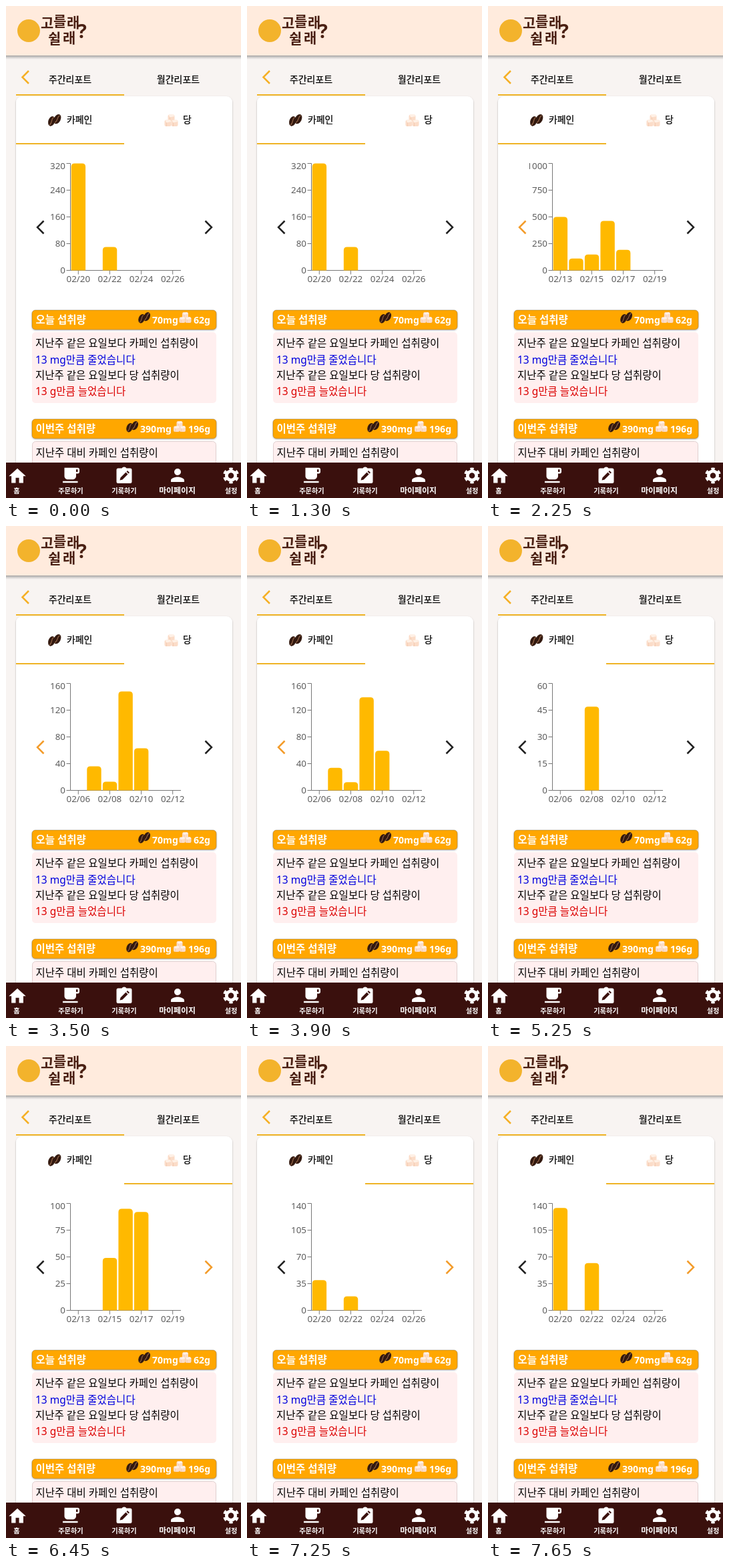
An HTML page that plays this animation: 352 px wide and 736 px high, repeating every 7950 ms.

```html
<!DOCTYPE html>
<html lang="ko">
<head>
<meta charset="utf-8">
<style>
  html, body { margin: 0; width: 100%; height: 100%; overflow: hidden; background: #f8f4f2; }
  svg { display: block; }
  text { font-family: "Noto Sans", "Noto Sans CJK KR", "Noto Sans CJK", sans-serif; font-size: 13.9px; }
  .mid { text-anchor: middle; }
  .tab { stroke: #000; stroke-width: .25; }
  .body text { font-size: 15.5px; }
  .head { fill: #fff; font-weight: 600; }
  .head text { font-size: 14.1px; }
  .head .title { font-size: 15.5px; font-weight: 700; }
  .bar { fill: #ffa700; stroke: #7a5a1e; stroke-opacity: .4; }
  .axis text { font-size: 13.4px; fill: #5c5c5c; }
  .chevron { fill: none; stroke: #222; stroke-width: 2.5; }
  .nav { fill: #fff; }
  .nav text { font-size: 10.2px; font-weight: 700; text-anchor: middle; }
  .word { fill: #4a2013; font-weight: 700; }
</style>
</head>
<body>
<svg width="352" height="736" viewBox="0 0 352 736">
  <defs>
    <linearGradient id="shade" x2="0" y2="1">
      <stop stop-color="#777" stop-opacity=".65"/><stop offset="1" stop-color="#999" stop-opacity="0"/>
    </linearGradient>
    <filter id="drop" x="-10%" y="-20%" width="120%" height="150%">
      <feDropShadow dx="0" dy="1" stdDeviation="1.2" flood-opacity=".3"/>
    </filter>
    <g id="bean">
      <ellipse rx="4.900" ry="7.600" fill="#33190f"/>
      <path d="M1-6.500C-2.500-3 2.500 2-1 6.500" fill="none" stroke="#9a6a4c" stroke-width="1.100"/>
    </g>
    <g id="beans">
      <use href="#bean" transform="translate(-4.200 1.800) rotate(20)"/>
      <use href="#bean" transform="translate(4.400 -1.400) rotate(26)"/>
    </g>
    <g id="cube">
      <rect x="-5" y="-4.500" width="10" height="9.500" rx="2.200" fill="#fbdcc8"/>
      <path d="M-4-4L3-5 5-2-2-.5z" fill="#fff1e6"/>
      <path d="M-2-.5V5" stroke="#efc3aa" stroke-width=".7"/>
    </g>
    <g id="cubes">
      <use href="#cube" y="-4"/><use href="#cube" x="-5" y="4"/><use href="#cube" x="5" y="4"/>
    </g>
    <clipPath id="plot"><rect x="62" y="230" width="210" height="190"/></clipPath>
    <clipPath id="tab"><rect x="177" y="134" width="162" height="72"/></clipPath>
  </defs>

  <rect width="352" height="736" fill="#f8f4f2"/>
  <rect y="74" width="352" height="6" fill="url(#shade)"/>
  <rect width="352" height="74" fill="#ffebdd"/>
  <circle cx="34" cy="37" r="17" fill="#f3b32c"/>
  <text class="word" x="52 71 91" y="33 30 32" style="font-size:21px">고를래</text>
  <text class="word" x="63 85 107" y="56 55 48" style="font-size:21px">쉴래<tspan style="font-size:29px">?</tspan></text>

  <path class="chevron" d="M34 97l-9.500 9.500 9.500 9.500" style="stroke:#f5b025"/>
  <text class="mid tab" x="96" y="114.500">주간리포트</text>
  <text class="mid tab" x="258" y="114.500">월간리포트</text>
  <rect x="15" y="135" width="324" height="620" rx="9" fill="#fff" filter="url(#drop)"/>
  <rect x="15" y="132" width="162" height="2" fill="#efb426"/>

  <circle id="ripple" cx="268" cy="185" clip-path="url(#tab)"/>
  <use href="#beans" x="72.500" y="170.500"/>
  <text class="tab" x="91" y="174.500">카페인</text>
  <use href="#cubes" x="247.500" y="171"/>
  <text class="tab" x="265" y="174.500">당</text>
  <rect id="indicator" y="205" width="162" height="2" fill="#efb426"/>

  <path id="prev" class="chevron" d="M56.500 321.500l-9.500 9.500 9.500 9.500"/>
  <path id="next" class="chevron" d="M298.500 321.500l9.500 9.500-9.500 9.500"/>
  <g id="chart" class="axis" clip-path="url(#plot)"></g>

  <g class="head">
    <rect class="bar" x="39" y="455" width="276" height="29" rx="5" filter="url(#drop)"/>
    <text class="title" x="44.500" y="475">오늘 섭취량</text>
    <use href="#beans" transform="translate(207 466) scale(.92)"/>
    <text x="219" y="475">70mg</text>
    <use href="#cubes" transform="translate(268.500 466) scale(.9)"/>
    <text x="281" y="475">62g</text>
    <rect class="bar" x="39" y="618" width="276" height="29" rx="5" filter="url(#drop)"/>
    <text class="title" x="44.500" y="638">이번주 섭취량</text>
    <use href="#beans" transform="translate(189 629) scale(.92)"/>
    <text x="201" y="638">390mg</text>
    <use href="#cubes" transform="translate(260 629) scale(.9)"/>
    <text x="273" y="638">196g</text>
  </g>
  <g class="body">
    <rect x="39" y="488" width="276" height="106" rx="5" fill="#ffefef"/>
    <text x="44" y="510">지난주 같은 요일보다 카페인 섭취량이</text>
    <text x="44" y="534.500" fill="#00d">13 mg만큼 줄었습니다</text>
    <text x="44" y="558">지난주 같은 요일보다 당 섭취량이</text>
    <text x="44" y="582" fill="#dc0000">13 g만큼 늘었습니다</text>
    <rect x="39.500" y="651.500" width="275" height="80" rx="5" fill="#ffefef" stroke="#e0cfcf"/>
    <text x="44.500" y="673.500">지난주 대비 카페인 섭취량이</text>
  </g>

  <g class="nav">
    <rect y="683" width="352" height="53" fill="#3a100d"/>
    <path transform="translate(1.800 688) scale(1.270)" d="M10 20v-6h4v6h5v-8h3L12 3 2 12h3v8z"/>
    <path transform="translate(82.500 687) scale(1.250)" d="M20 3H4v10c0 2.210 1.790 4 4 4h6c2.210 0 4-1.790 4-4v-3h2c1.110 0 2-.89 2-2V5c0-1.110-.89-2-2-2zm0 5h-2V5h2zM2 21h18v-2H2z"/>
    <path d="M168 691.500h5.500a4 4 0 0 1 7 0h5.500q2.500 0 2.500 2.500v17.500q0 2.500-2.500 2.500h-18q-2.500 0-2.500-2.500V694q0-2.500 2.500-2.500z"/>
    <path d="M170.500 709.500l1-4 8-8 3 3-8 8zM180.500 696.500l1.500-1.500 3 3-1.500 1.500z" fill="#3a100d"/>
    <path transform="translate(242 687) scale(1.250)" d="M12 12a4 4 0 1 0 0-8 4 4 0 0 0 0 8zm0 2c-2.670 0-8 1.340-8 4v2h16v-2c0-2.660-5.330-4-8-4z"/>
    <g transform="translate(337 702.500) rotate(-90)" fill="none" stroke="#fff">
      <circle r="6.700" stroke-width="4.800"/>
      <circle r="10" stroke-width="4" pathLength="12" stroke-dasharray="1 1" stroke-dashoffset=".5"/>
    </g>
    <text x="16" y="729">홈</text>
    <text x="97" y="729">주문하기</text>
    <text x="177" y="729">기록하기</text>
    <text x="256.500" y="729" style="font-size:11.900px">마이페이지</text>
    <text x="337" y="729">설정</text>
  </g>
</svg>
<script>
const LOOP = 7950, TICK = 50, GROW = 500;
const BASE = 395.5, LEFT = 96.5, HEIGHT = 160, BAND = 165 / 7;

// Each view appears at `show`; its bars grow from zero starting at `grow`.
const views = [
  { show: 0, grow: -GROW, day: 20, step: 80, data: [320, 0, 70] },
  { show: 2050, grow: 2100, day: 13, step: 250, data: [975, 215, 290, 900, 375] },
  { show: 3500, grow: 3550, day: 6, step: 40, data: [0, 36, 13, 148, 63] },
  { show: 4750, grow: 4750, day: 6, step: 15, data: [0, 0, 47] },
  { show: 5900, grow: 5950, day: 13, step: 25, data: [0, 0, 49, 95, 92] },
  { show: 7100, grow: 7150, day: 20, step: 35, data: [134, 0, 62] }
];

const el = id => document.getElementById(id);
const clamp = v => Math.min(1, Math.max(0, v));

function bezier(x1, y1, x2, y2) {
  const at = (a, b, u) => 3 * a * u * (1 - u) ** 2 + 3 * b * u * u * (1 - u) + u ** 3;
  return x => {
    if (x <= 0 || x >= 1) return clamp(x);
    let lo = 0, hi = 1;
    for (let i = 0; i < 24; i++) {
      const m = (lo + hi) / 2;
      if (at(x1, x2, m) < x) lo = m; else hi = m;
    }
    return at(y1, y2, lo);
  };
}
const ease = bezier(.25, .1, .25, 1);
const standard = bezier(.4, 0, .2, 1);

function bar(i, h) {
  if (h < .3) return '';
  const r = Math.min(5, h), w = 21.4, x = LEFT + BAND * i + 1.2;
  return `<path fill="#ffb900" d="M${x} ${BASE}v${r - h}q0 ${-r} ${r} ${-r}h${w - 2 * r}q${r} 0 ${r} ${r}v${h - r}z"/>`;
}

function chart({ day, step, data }, scale) {
  let lines = `M${LEFT} ${BASE - HEIGHT}V${BASE}H262`, out = '';
  for (let i = 0; i < 5; i++) {
    const y = BASE - i * 40;
    lines += `M${LEFT - 6} ${y}h6`;
    out += `<text text-anchor="end" x="89" y="${Math.max(y, 239.5) + 4.7}">${i * step}</text>`;
  }
  for (let i = 0; i < 7; i += 2) {
    const x = LEFT + BAND * (i + .5);
    lines += `M${x} ${BASE}v6`;
    out += `<text class="mid" x="${x}" y="413">02/${String(day + i).padStart(2, '0')}</text>`;
  }
  const bars = data.map((v, i) => bar(i, v / step / 4 * HEIGHT * scale)).join('');
  return `<path d="${lines}" stroke="#777" fill="none"/>${out}${bars}`;
}

function draw(t) {
  const view = views.filter(v => v.show <= t).pop();
  const scale = t < view.grow ? 1 : ease((t - view.grow) / GROW);
  el('chart').innerHTML = chart(view, scale);

  const tint = on => on ? '#f39c2b' : '#222';
  el('prev').style.stroke = tint(t >= 2000 && t < 4750);
  el('next').style.stroke = tint(t >= 5850);
  el('indicator').setAttribute('x', 15 + 162 * standard(clamp((t - 4750) / 300)));

  const wave = standard(t < 4750 ? 0 : clamp((t - 4700) / 550));
  el('ripple').setAttribute('r', 105 * wave);
  el('ripple').setAttribute('opacity', (.14 + .16 * wave) * (1 - wave));
}

function frame(now) {
  draw(Math.floor(now % LOOP / TICK) * TICK);
  requestAnimationFrame(frame);
}
draw(0);
requestAnimationFrame(frame);
</script>
</body>
</html>
```
